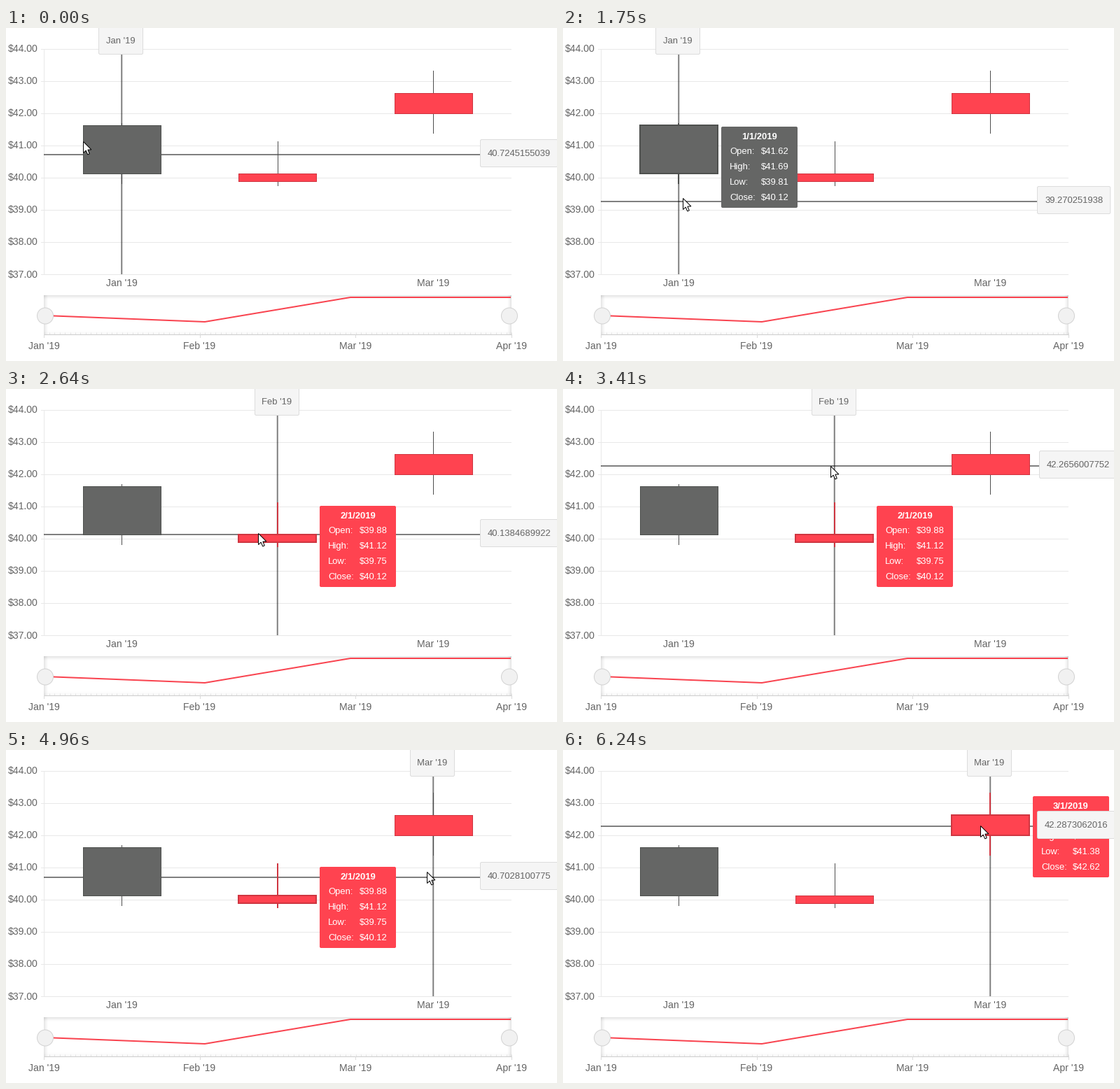
A matplotlib script that plays this animation: 787x476 px, repeating every 7.01 s.

```python
import math

import numpy as np
import matplotlib.pyplot as plt
from matplotlib.animation import FuncAnimation
from matplotlib.patches import Circle, FancyBboxPatch, Polygon, Rectangle

W, H, DPI = 787, 476, 100
LOOP, TICK = 7010, 10
LEFT, TOP, BOTTOM = 54, 30, 352
SLOT = 222.5
RIGHT = LEFT + 3 * SLOT
UNIT = 322.5 / 7  # pixels per dollar
GREY, RED, INK = "#656665", "#ff4350", "#656565"
MONTHS = ["Jan '19", "Feb '19", "Mar '19", "Apr '19"]

plt.rcParams["font.family"] = "Liberation Sans"
fig = plt.figure(figsize=(W / DPI, H / DPI), dpi=DPI, facecolor="white")
ax = fig.add_axes([0, 0, 1, 1])
ax.set_xlim(0, W)
ax.set_ylim(H, 0)
ax.axis("off")


def px(n):
    """Pixels to points."""
    return n * 72 / DPI


def slot_mid(k):
    return LEFT + SLOT * (k + 0.5)


def price_y(price):
    return BOTTOM + 0.5 - (price - 37) * UNIT


def bar(x, y, w, h, color, z=1, alpha=1, snap=None):
    return ax.add_patch(Rectangle((x, y), w, h, fc=color, lw=0, alpha=alpha,
                                  zorder=z, snap=snap))


def label(x, y, s, size=14, color=INK, z=3, **kw):
    return ax.text(x, y, s, fontsize=px(size), color=color, zorder=z,
                   va="baseline", **kw)


def rounded(x, y, w, h, fill, edge, z):
    style = "round,pad=0,rounding_size=2"
    return ax.add_patch(FancyBboxPatch((x, y), w, h, boxstyle=style, fc=fill,
                                       ec=edge, lw=px(1), zorder=z))


def draw_axes():
    for k in range(8):
        bar(50, TOP + 46 * k, RIGHT - 50, 1, "#e8e8e8")
        label(46, 34 + UNIT * k, f"${44 - k}.00", ha="right")
    bar(LEFT, TOP, 1, BOTTOM - TOP, "#e8e8e8")
    for k in (0, 2):
        label(slot_mid(k), 369, MONTHS[k], ha="center")


def draw_navigator():
    x0, y0, x1, y1 = LEFT, 382, RIGHT, 438
    for k in range(6):
        a = 0.1 * (1 - k / 6) ** 1.5
        bar(x0, y0 + k, x1 - x0, 1, "black", 2, a)
        bar(x0 + k, y0, 1, y1 - y0, "black", 2, a)
        bar(x1 - 1 - k, y0, 1, y1 - y0, "black", 2, a)
        bar(x0, y1 - 1 - k, x1 - x0, 1, "black", 2, a / 3)
    days = np.linspace(x0, x1, 91)
    ax.vlines(np.floor(days) + 0.5, 435, 438, colors="#e4e4e4", lw=px(1), zorder=2)
    bar(x0, y1, x1 - x0 + 1, 1, "#cfcfcf", 2)
    for k, month in enumerate(MONTHS):
        x = x0 + SLOT * k
        bar(x, y1, 1, 5, "#dadada", 2)
        label(x, 459, month, ha="center")
    ax.plot([56, 284, 492, 721], [411, 420, 385, 385], color="#f9434f",
            lw=px(2), zorder=3, solid_capstyle="butt")
    for x in (56, 719):
        ax.add_patch(Circle((x, 411.5), 11.5, fc="#f1f1f1", ec="#d3d3d3",
                            lw=px(1), zorder=4))


class Candle:
    """A candle with its highlighted state and its tooltip."""

    def __init__(self, k, fill, edge, open_, high, low, close):
        self.edge = edge
        self.mid = round(slot_mid(k))
        self.left = round(slot_mid(k) - 55.6)
        self.right = self.left + 112
        self.top = math.floor(price_y(max(open_, close)))
        self.bottom = math.ceil(price_y(min(open_, close)))
        tip = math.floor(price_y(high))
        self.wick = bar(self.mid, tip, 1, round(price_y(low)) - tip, edge, 3)
        self.frame = bar(0, 0, 1, 1, edge, 3.5)
        self.body = bar(0, 0, 1, 1, fill, 3.6)

        x, y = self.right + 4, tip + 5
        self.tooltip = [rounded(x, y, 109, 116, fill, "none", 6),
                        label(x + 54.5, y + 18, f"{k + 1}/1/2019", 13, "white", 6.5,
                              ha="center", weight="bold")]
        rows = {"Open": open_, "High": high, "Low": low, "Close": close}
        for n, (name, price) in enumerate(rows.items()):
            base = y + 39 + 22 * n
            self.tooltip += [label(x + 12, base, name + ":", 13, "white", 6.5),
                             label(x + 57, base, f"${price:.2f}", 13, "white", 6.5)]

    def hit(self, x, y):
        return self.left < x < self.right and self.top - 2 < y < self.bottom + 2

    def show(self, active):
        line = 2 if active else 1
        x, y = self.left + 1 - line, self.top + 1 - line
        w, h = self.right - x, self.bottom - y
        self.frame.set_bounds(x, y, w, h)
        self.body.set_bounds(x + line, y + line, w - 2 * line, h - 2 * line)
        self.wick.set_x(self.mid + 1 - line)
        self.wick.set_width(line)
        self.wick.set_facecolor(self.edge if active else "#4f4f4f")
        for part in self.tooltip:
            part.set_visible(active)


draw_axes()
draw_navigator()

candles = [Candle(0, GREY, "#4f514f", 41.62, 41.69, 39.81, 40.12),
           Candle(1, RED, "#cf3641", 39.88, 41.12, 39.75, 40.12),
           Candle(2, RED, "#cf3641", 42.00, 43.31, 41.38, 42.62)]

# Crosshair, its two labels and the pointer
h_line = bar(LEFT, 0, RIGHT - LEFT, 2, "black", 2, 0.5)
v_line = bar(0, TOP, 2, BOTTOM - TOP, "black", 2, 0.5, snap=False)
top_box = rounded(0, -5.5, 63, 43, "#f5f5f5", "#dcdcdc", 5)
top_text = label(0, 22, "", 13, z=5.5, ha="center")
side_box = rounded(0, 0, 110, 39, "#f5f5f5", "#dcdcdc", 7)
side_text = label(0, 0, "", 13, z=7.5)
ARROW = np.array([(0, 0), (0, 16), (3.7, 12.6), (6.2, 18.4), (8.8, 17.3),
                  (6.4, 11.6), (11.4, 11.4)])
pointer = ax.add_patch(Polygon(ARROW, fc="white", ec="black", lw=px(1), zorder=9))

# Turning points of the sweep: time, x, crosshair y
TURNS = np.array([(0, 110, 180.5), (60, 112, 151.5), (430, 141, 127.5),
                  (880, 158, 179.5), (1530, 170, 263.5), (1750, 171, 247.5),
                  (2300, 318, 157.5), (2640, 360, 207.5), (3400, 382, 109.5),
                  (4070, 400, 248.5), (4290, 413, 274.5), (4960, 601, 181.5),
                  (5180, 607, 128.5), (5500, 601, 94.5), (5720, 600, 94.5),
                  (6240, 596, 108.5)])
LEAD = 32  # ms by which the pointer runs ahead of the crosshair

# The picture refreshes in bursts, every 110 ms counted back from each end
BURSTS = [(100, 760), (880, 1530), (1650, 2300), (2420, 2640), (2960, 3620),
          (3720, 4400), (4500, 5180), (5270, 5500), (5720, 6240)]
STEPS = sorted([0] + [t for start, end in BURSTS
                      for t in (start, *range(end, start + 50, -110))])


def smooth(t, col):
    """Cubic through the turning points that never overshoots them."""
    ts, vs = TURNS[:, 0], TURNS[:, col]
    t = min(t, ts[-1])
    gap = np.diff(ts)
    rise = np.diff(vs) / gap
    a, b = rise[:-1], rise[1:]
    same = a * b > 0
    inner = np.where(same, 2 * a * b / np.where(same, a + b, 1), 0)
    slope = np.r_[rise[0], inner, rise[-1]]
    k = min(np.searchsorted(ts, t, side="right") - 1, len(gap) - 1)
    s = (t - ts[k]) / gap[k]
    ease = s * s * (3 - 2 * s)
    bend = s * (1 - s) * gap[k] * ((1 - s) * slope[k] - s * slope[k + 1])
    return vs[k] + (vs[k + 1] - vs[k]) * ease + bend


def trace():
    """Pointer, crosshair and last candle touched at every refresh."""
    poses, active = [], None
    for t in STEPS:
        x, cross, y = round(smooth(t, 1)), smooth(t, 2), smooth(t + LEAD, 2)
        active = next((c for c in candles if c.hit(x, y)), active)
        poses.append((x, y, cross, active))
    return poses


POSES = trace()


def price_text(row):
    value = 37 + (BOTTOM - 0.40625 - row) / UNIT
    return f"{value:.10f}".rstrip("0")


def update(i):
    step = np.searchsorted(STEPS, i * TICK, side="right") - 1
    x, y, cross, active = POSES[step]
    row = int(cross)
    for candle in candles:
        candle.show(candle is active)

    slot = int((x - LEFT) / SLOT)
    mid = slot_mid(slot)
    v_line.set_x(mid - 1)
    h_line.set_y(row)
    top_box.set_x(round(mid) - 32.5)
    top_text.set_x(round(mid) - 1)
    top_text.set_text(MONTHS[slot])

    text = price_text(row)
    side = 680 if y > cross else 677
    side_box.set_bounds(side + 0.5, row - 20.5, 7.23 * len(text) + 17.5, 39)
    side_text.set_position((side + 11, row + 3))
    side_text.set_text(text)

    pointer.set_xy(ARROW + (x + 0.5, int(y) + 0.5))


anim = FuncAnimation(fig, update, frames=LOOP // TICK, interval=TICK, repeat=True)
plt.show()
```
